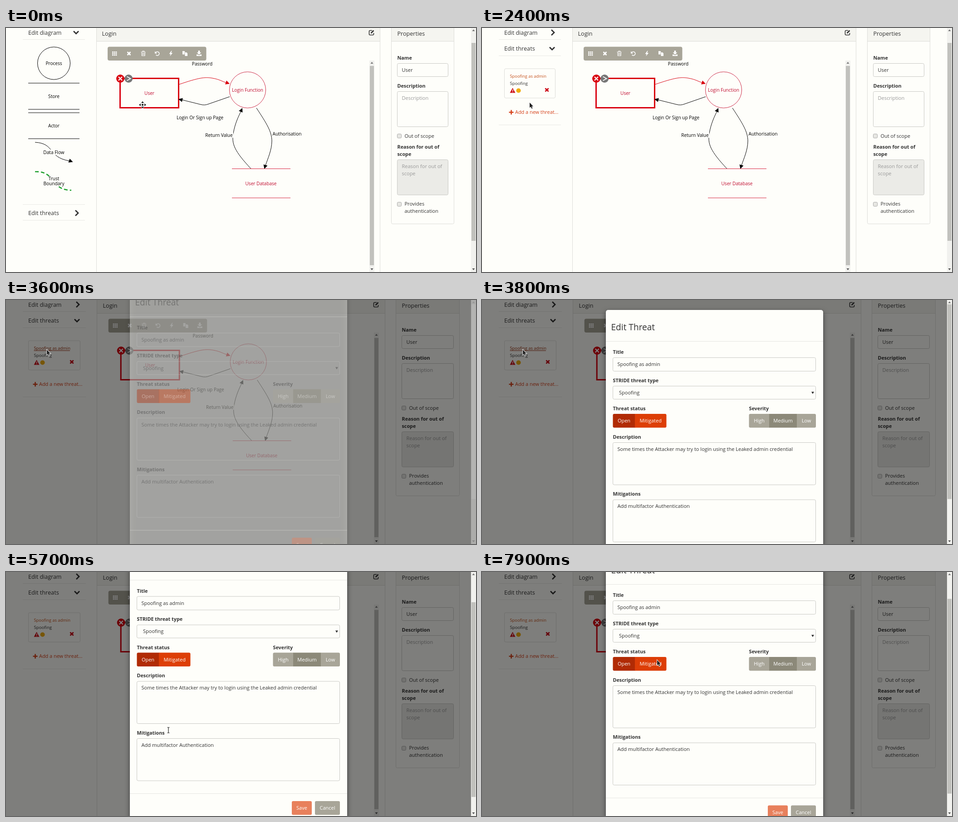
An HTML page with a canvas that plays this animation: 1036 px wide and 540 px high, repeating every 8000 ms.

```html
<!DOCTYPE html>
<html>
<head>
<meta charset="utf-8">
<style>
  html, body { margin: 0; width: 100%; height: 100%; overflow: hidden; background: #fefefa; }
  canvas { display: block; }
</style>
</head>
<body>
<canvas id="stage" width="1036" height="540"></canvas>
<script>
const ctx = document.getElementById('stage').getContext('2d');
const PAPER = '#fefefa', INK = '#333', RED = '#d9000f', CRIMSON = '#c00a2e';
const BORDER = '#ddddd9', FIELD = '#c9c9c5', TAUPE = '#a8a598', ORANGE = '#dd3e07';
const LOOP = 8000, MODAL_START = 3500;

// Stepped timelines: [time, ...values]
const scrolls = [[0, 0], [5600, 40], [5700, 73.5], [6000, 60], [6400, 50], [6500, 38],
  [6600, 27], [6700, 16], [6800, 7], [6900, 0], [7900, 64]];
const accordion = [[0, 0, 0], [1600, .43, .727], [1700, .76, .92], [1800, .95, 1], [1900, 1, 1]];
const pointer = [[0, 301, 170, 'move'], [200, 301, 168, 'move'], [300, 301, 166, 'move'],
  [700, 301, 170, 'move'], [900, 143, 381], [1100, 130, 390], [1200, 110, 402], [1300, 97, 406],
  [1800, 100, 300], [1900, 108, 203], [2100, 108, 199], [2200, 109, 190], [2300, 108, 181],
  [2400, 105, 165], [2500, 100, 148], [2600, 95, 130], [2700, 91, 122], [2800, 88, 128],
  [3100, 239, 128], [3200, 89, 112], [3400, 90, 110], [4000, 175, 215], [4100, 224, 269],
  [4300, 238, 277], [4700, 258, 190], [4800, 276, 128], [5000, 290, 98], [5100, 395, 262],
  [5200, 303, 134], [5400, 358, 350, 'beam'], [6500, 366, 300], [6700, 378, 240], [6900, 386, 195]];

const at = (table, t) => table.filter(row => row[0] <= t).pop().slice(1);
const progress = (t, start, duration) => Math.max(0, Math.min(1, (t - start) / duration));

function text(s, x, y, size = 11, color = INK, align = 'left', weight = 400) {
  ctx.font = `${weight} ${size}px "Open Sans", "Noto Sans", sans-serif`;
  ctx.textAlign = align;
  ctx.fillStyle = color;
  ctx.fillText(s, x, y + size * .36);
}
const bold = (s, x, y) => text(s, x, y, 10.8, INK, 'left', 700);
const label = (s, x, y, color = '#000') => text(s, x, y, 10.1, color, 'center', 500);

function fill(color, x, y, w, h) {
  ctx.fillStyle = color;
  ctx.fillRect(x, y, w, h);
}
function box(x, y, w, h, { bg, line, r = 3, width = 1 } = {}) {
  ctx.beginPath();
  ctx.roundRect(x, y, w, h, r);
  if (bg) { ctx.fillStyle = bg; ctx.fill(); }
  if (line) { ctx.strokeStyle = line; ctx.lineWidth = width; ctx.stroke(); }
}
function stroke(d, color = '#000', width = 1) {
  ctx.strokeStyle = color;
  ctx.lineWidth = width;
  ctx.stroke(new Path2D(d));
}
function shape(d, color = '#000') {
  ctx.fillStyle = color;
  ctx.fill(new Path2D(d));
}
function circle(x, y, r, bg, line) {
  box(x - r, y - r, 2 * r, 2 * r, { bg, line, r });
}
const hline = (x1, x2, y, color, width) => stroke(`M${x1} ${y}H${x2}`, color, width);
const cross = (x, y, r, color, width) =>
  stroke(`M${x - r} ${y - r}l${2 * r} ${2 * r}m0 ${-2 * r}l${-2 * r} ${2 * r}`, color, width);

function shifted(x, y, draw) {
  ctx.save();
  ctx.translate(x, y);
  draw();
  ctx.restore();
}
function clipped(x, y, w, h, draw) {
  ctx.save();
  ctx.beginPath();
  ctx.rect(x, y, w, h);
  ctx.clip();
  draw();
  ctx.restore();
}
function arrowHead(x, y, angle, color) {
  shifted(x, y, () => { ctx.rotate(angle); shape('M0 0L-9 -4.5V4.5Z', color); });
}
function chevron(x, y, down) {
  stroke(down ? `M${x - 6} ${y - 3}l5.5 5.5l5.5 -5.5` : `M${x - 3} ${y - 6}l6 6l-6 6`, INK, 2.8);
}
function scrollbar(x, top, thumbTop, thumbEnd) {
  fill('#f1f1ee', x, top, 11, 540 - top);
  fill('#c1c1bd', x + 1, thumbTop, 9, thumbEnd - thumbTop);
  shape(`M${x + 2.5} ${top + 7}h6l-3 -4Z`, '#777');
  shape(`M${x + 2.5} 532h6l-3 4Z`, '#555');
}

function diagramShapes() {
  circle(105.5, 78, 36, null, '#000');
  label('Process', 105.5, 78);
  for (const y of [122, 180, 187.5, 245]) hline(49, 162, y, '#555', 1.3);
  label('Store', 105.5, 151);
  label('Actor', 105.5, 216.5);
  stroke('M64 253C108 255 92 286 139 294');
  arrowHead(147.5, 296.5, .35);
  fill(PAPER, 82, 269, 47, 12);
  label('Data Flow', 105.5, 275);
  ctx.setLineDash([8, 5]);
  stroke('M64 318C88 317 96 328 105 339S122 359 144 359', '#1c9f2c', 2.6);
  ctx.setLineDash([]);
  fill(PAPER, 92, 328, 27, 11);
  fill(PAPER, 82, 339, 47, 10);
  label('Trust', 105.5, 333.5);
  label('Boundary', 105.5, 344);
}

// Coordinates start at the top of the panel body
function threatList(t, wide) {
  const hoverTitle = (t >= 2600 && t < 2800) || (t >= 3400 && t < 4000);
  const hoverAdd = t >= 2200 && t < 2400;
  box(49.5, 29.5, 112 + wide * 2, 65, { line: BORDER });
  const titleColor = hoverTitle ? '#962d0a' : '#c4501b';
  text('Spoofing as admin', 61.5, 46.5, 9.3, titleColor);
  if (hoverTitle) hline(61.5, 141, 51.5, titleColor);
  text('Spoofing', 61.5, 62.5, 9.6);
  shape('M67.5 72L73.5 83H61.5Z', '#cc0c18');
  fill('#fff', 67, 75.5, 1.4, 4);
  fill('#fff', 67, 80.3, 1.4, 1.4);
  circle(80.5, 78, 5, '#f0ad0e');
  cross(143 + wide * 2, 76.5, 3.6, '#cc0c18', 2.8);
  const addColor = hoverAdd ? '#962d0a' : '#d5411a';
  stroke('M59.5 126h10m-5 -5v10', addColor, 2.6);
  text('Add a new threat...', 73, 126, 10.9, addColor);
  if (hoverAdd) hline(59, 169, 131.5, addColor);
}

function sidebar(t, wide) {
  const [closed, opened] = at(accordion, t), toggled = t >= 1600;
  const right = 174 + wide * 2, cx = 155 + wide * 2;
  const end = 390 - 364 * closed, bodyTop = end + 34.5, bodyH = 154 * opened;
  const rule = y => hline(37, right, Math.round(y) + .5, '#e9e9e5');
  text('Edit diagram', 49, 10, 12.5);
  chevron(cx + (toggled ? 1 : 0), 10, !toggled);
  rule(25);
  clipped(37, 26, 140, end - 26, diagramShapes);
  if (end > 26) rule(end);
  text('Edit threats', 49, end + 19, 12.7);
  if (t >= 1300 && t < 1800) hline(49, 117, Math.round(end) + 25.5, INK);
  chevron(cx + (toggled ? 0 : 1), end + 19.5, toggled);
  rule(bodyTop);
  clipped(30, bodyTop, 150, bodyH, () => shifted(0, Math.round(bodyTop) - .5, () => threatList(t, wide)));
  if (opened) rule(bodyTop + bodyH - 1);
}

function toolbar() {
  box(224, 41.5, 217.5, 30.5, { bg: TAUPE, r: 4 });
  for (let i = 0; i < 9; i++) fill('#fff', 234 + i % 3 * 3.8, 52 + (i / 3 | 0) * 3.4, 2.8, 2.4);
  cross(271, 56.5, 3.4, '#fff', 2.8);
  stroke('M297.5 53h10M301 52.5v-1.5h3.5v1.5M299 54l.5 7.5h6.5l.5 -7.5M301.5 55v5m2.5 -5v5', '#fff', 1.2);
  stroke('M330 54.5a4.2 4.2 0 1 1 .5 5', '#fff', 1.6);
  shape('M328 51.5v5h5Z', '#fff');
  shape('M364.5 50.5l-5 7h3.3l-1.5 5l6 -7.5h-3.5l2 -4.5Z', '#fff');
  shape('M389 51h4l1.5 1.5v6h-5.5ZM394 54h4l2 2v6h-6Z', '#fff');
  stroke('M394 53.5v8.5', TAUPE, .8);
  shape('M423.7 50h3.6v4h3l-4.8 5l-4.8 -5h3ZM420 58.5h2.5l3 2l3 -2h2.5v3.5h-11Z', '#fff');
}

function diagram() {
  toolbar();
  box(251.5, 111.5, 129, 65, { line: RED, r: 0, width: 3 });
  label('User', 316, 144.5, CRIMSON);
  circle(252, 112, 9, RED);
  cross(252, 112, 4, '#fff', 2.4);
  circle(270.2, 112, 9, '#777');
  stroke('M266.5 107.5l8 4.5l-8 4.5', '#fff', 1.8);

  stroke('M381 125C425 110 438 108 455 111S475 118 486 121', RED);
  arrowHead(493, 123.5, .35, RED);
  stroke('M493 152L447 168Q438 172 428 169L388 159');
  arrowHead(380, 157.5, Math.PI + .2);
  stroke('M540.5 312C503 272 497 256 501 233S513 195 518 184');
  arrowHead(521, 177, -1.15);
  stroke('M552 177C575 212 586 230 586 250S577 289 572 304');
  arrowHead(569.5, 312, 1.85);

  circle(532.5, 137, 40, null, '#cc2744');
  label('Login Function', 532.5, 137.5, CRIMSON);
  hline(498, 627, 311.5, '#d8243f', 1.2);
  hline(498, 627, 376, '#d8243f', 1.2);
  label('User Database', 562, 344, CRIMSON);
  label('Password', 432.5, 79);
  label('Login Or Sign up Page', 427.5, 198.5);
  fill(PAPER, 438, 231, 63, 12);
  label('Return Value', 469.5, 237);
  label('Authorisation', 619.5, 234.5);
}

function canvasPanel(wide) {
  const left = 199.5 + wide, right = 824.5 + wide * 11;
  fill('#f5f5f0', left, 0, right - left, 29);
  stroke(`M${left} 0V540M${right} 0V540M${left} 29.5H${right}`, BORDER);
  text('Login', 211.5 + wide * 2, 12.5, 12.6);
  shifted(wide * 10, 0, () => {
    stroke('M807 5.5H802.5Q800.5 5.5 800.5 7.5V13.5Q800.5 15.5 802.5 15.5H808.5Q810.5 15.5 810.5 13.5V11', INK, 1.6);
    stroke('M804.5 11.5L810.5 5.5', INK, 2.6);
    scrollbar(801, 72, 84, 525);
  });
  shifted(wide * 1.7, 0, diagram);
}

function properties(wide) {
  const w = 112 + wide * 2, field = (y, h, bg) => box(862.5, y + .5, w, h, { line: FIELD, bg });
  const hint = (s, y) => text(s, 872.5, y, 11, '#999');
  const check = y => box(862.5, y - 4.5, 9, 9, { line: '#aaa', bg: '#e6e6e2', r: 2 });
  shifted(wide * 10, 0, () => {
    const pw = 138 + wide * 2;
    fill('#f5f5f0', 849.5, 0, pw, 29);
    box(849.5, -9.5, pw, 443, { line: BORDER });
    hline(849.5, 849.5 + pw, 29.5, BORDER);
    text('Properties', 862.5, 12.5, 12.6);
    bold('Name', 862.5, 66);
    field(78, 29);
    text('User', 872.5, 93);
    bold('Description', 862.5, 128);
    field(140, 78);
    hint('Description', 155.5);
    check(239);
    text('Out of scope', 878.5, 239);
    bold('Reason for out of', 862.5, 263);
    bold('scope', 862.5, 279);
    field(291, 78, '#ebebe7');
    hint('Reason for out of', 306.5);
    hint('scope', 322.5);
    check(390);
    text('Provides', 878.5, 389.5);
    text('authentication', 878.5, 405.5);
  });
}

function modal(y) {
  const field = (top, h) => box(288.5, top + .5, 447, h, { line: FIELD });
  const button = (s, x, top, w, bg, r = 3) => {
    box(x, top, w, 30.5, { bg, r });
    text(s, x + w / 2, top + 15.5, 11, '#fff', 'center');
  };
  shifted(0, y, () => {
    ctx.save();
    ctx.shadowColor = 'rgba(0,0,0,.5)';
    ctx.shadowBlur = 12;
    ctx.shadowOffsetY = 4;
    box(273, 22, 479, 601, { bg: PAPER, r: 5 });
    ctx.restore();
    text('Edit Threat', 284.5, 60, 19.1);
    hline(273, 752, 91.5, '#e5e5e1');
    bold('Title', 288.5, 115.5);
    field(127, 30);
    text('Spoofing as admin', 298.5, 142.5, 10.9);
    bold('STRIDE threat type', 288.5, 178);
    field(190, 29);
    text('Spoofing', 302, 205);
    shape('M726 203h6l-3 5Z', INK);
    bold('Threat status', 288.5, 240.5);
    bold('Severity', 588.5, 240.5);
    button('Open', 288.5, 252, 49, '#b12b05', [3, 0, 0, 3]);
    button('Mitigated', 337, 252, 69.5, ORANGE, [0, 3, 3, 0]);
    button('High', 588.5, 252, 45, TAUPE, [3, 0, 0, 3]);
    button('Medium', 633, 252, 61, '#8c8979', 0);
    button('Low', 694, 252, 42, TAUPE, [0, 3, 3, 0]);
    bold('Description', 288.5, 303);
    field(315, 93.5);
    text('Some times the Attacker may try to login using the Leaked admin credential', 298.5, 330);
    bold('Mitigations', 288.5, 429.5);
    field(441.5, 93.5);
    text('Add multifactor Authentication', 298.5, 456.5, 11.1);
    hline(273, 752, 564, '#e5e5e1');
    button('Save', 630, 580.5, 44, '#e8805c');
    button('Cancel', 681, 580.5, 55, TAUPE);
  });
}

// The backdrop darkens first, then the dialog fades in and slides down
function overlay(t) {
  const scroll = at(scrolls, t)[0];
  fill(`rgba(0,0,0,${progress(t, 3450, 150) / 2})`, 0, 0, 1036, 540);
  ctx.globalAlpha = progress(t, 3540, 150);
  modal(-scroll - 85 * (1 - progress(t, 3540, 260)) ** 1.7);
  scrollbar(1025, 0, 9.5 + scroll * .78, 440.5 + scroll * .78);
  ctx.globalAlpha = 1;
}

function drawPointer([x, y, kind]) {
  shifted(x, y, () => {
    if (kind === 'move') {
      const arrows = 'M0 -8l3 4h-6ZM0 8l3 -4h-6ZM-8 0l4 -3v6ZM8 0l-4 -3v6ZM-2 -2h4v4h-4Z';
      stroke(arrows, '#fff', 1.5);
      shape(arrows, '#222');
    } else if (kind === 'beam') {
      stroke('M-2.5 -6H2.5M0 -6V6M-2.5 6H2.5', '#222', 1.2);
    } else {
      const arrow = 'M0 0V11.5L2.6 9.2L4.6 13.6L6.5 12.8L4.5 8.4H8Z';
      stroke(arrow, '#fff', 1.6);
      shape(arrow, '#222');
    }
  });
}

function frame(now) {
  const t = Math.floor(now % LOOP / 100) * 100;
  const wide = t >= MODAL_START ? 1 : 0;
  fill(PAPER, 0, 0, 1036, 540);
  sidebar(t, wide);
  canvasPanel(wide);
  properties(wide);
  if (wide) overlay(t);
  else scrollbar(1025, 0, 33, 471);
  drawPointer(at(pointer, t));
  requestAnimationFrame(frame);
}
requestAnimationFrame(frame);
</script>
</body>
</html>
```
